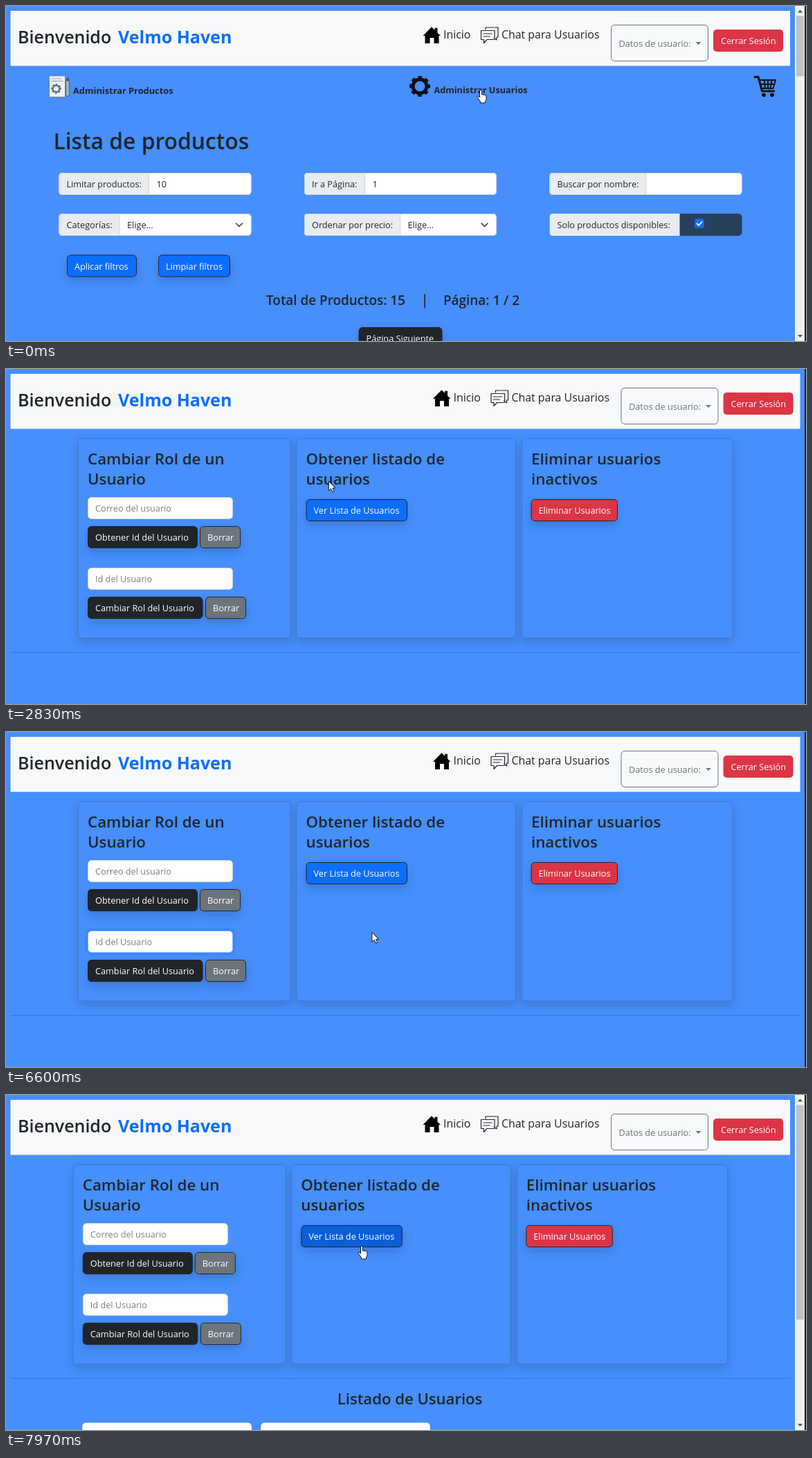
These frames come from a looping animation (1156 by 484 pixels, 8 s). An HTML page:

```html
<!DOCTYPE html>
<html lang="es">
<head>
<meta charset="utf-8">
<style>
  html, body { margin: 0; width: 100%; height: 100%; overflow: hidden; background: #468ffc; }
  svg { display: block; font-family: "Open Sans", "Noto Sans", sans-serif; }
  .shadow { filter: drop-shadow(0 6.8px 6.8px rgba(0, 0, 0, .15)); }
</style>
</head>
<body>
<svg id="stage" width="1156" height="484" viewBox="0 0 1156 484"></svg>
<script>
const LOOP = 8000;
const BLUE = '#0d6efd', INK = '#212529', RED = '#dc3545', GRAY = '#6c757d', PAGE = '#468ffc';
const stage = document.getElementById('stage');

// ---- drawing helpers ----
const text = (x, y, s, size = 12.7, weight = 400, fill = INK) =>
  `<text x="${x}" y="${y}" font-size="${size}" font-weight="${weight}" fill="${fill}">${s}</text>`;
const rect = (x, y, w, h, fill, extra = '') =>
  `<rect x="${x}" y="${y}" width="${w}" height="${h}" fill="${fill}" ${extra}/>`;
const path = (d, fill, extra = '') => `<path d="${d}" fill="${fill}" ${extra}/>`;
const line = (d, color, width) =>
  path(d, 'none', `stroke="${color}" stroke-width="${width}" stroke-linecap="round" stroke-linejoin="round"`);
const group = (id, body) => `<g id="${id}">${body}</g>`;

const button = (x, y, w, label, fill, id = '') => `<g ${id && `id="${id}"`}>
  ${rect(x + .5, y + .5, w - 1, 31, fill, 'rx="5" stroke="#212529" class="shadow"')}
  ${text(x + 11, y + 21, label, 12.7, 400, '#fff')}</g>`;

const input = (id, y, label) => group(id,
  rect(116.5, y - 1.5, 213, 35, 'none', 'rx="6.5" stroke="#0d6efd" stroke-opacity=".25" stroke-width="3.4" class="ring"') +
  rect(118.5, y + .5, 209, 31, '#fff', 'rx="5" stroke="#ced4da" class="box"') +
  text(129, y + 21, label, 12.7, 400, '#7b8085') +
  rect(128.5, y + 8, 1.2, 17, '#111', 'class="caret"'));

const field = (x, y, labelWidth, label, value = '', kind = '') => {
  const split = x + labelWidth, dark = kind === 'check';
  return rect(x, y, 278, 32, dark ? '#283f5b' : '#fff', 'rx="5"') +
    path(`M${split} ${y}H${x + 5}q-5 0 -5 5v22q0 5 5 5H${split}z`, '#e9ecef') +
    (dark ? '' : line(`M${split} ${y + .5}v31`, '#ced4da', 1) +
      rect(x + .5, y + .5, 277, 31, 'none', 'rx="5" stroke="#ced4da"')) +
    text(x + 11, y + 20.8, label) + text(split + 11, y + 20.8, value) +
    (kind === 'select' ? line(`M${x + 256} ${y + 14}l4.5 4.5l4.5 -4.5`, '#343a40', 1.5) : '') +
    (dark ? rect(split + 21.5, y + 7.5, 13.5, 13.5, BLUE, 'rx="3"') +
      line(`M${split + 25} ${y + 14.5}l2.5 2.5l4.5 -5`, '#fff', 1.8) : '');
};

const gear = (x, y, scale, color) => `<g transform="translate(${x} ${y}) scale(${scale})" fill="none" stroke="${color}">
  <circle r="10" stroke-width="5"/>
  <circle r="13" stroke-width="4" stroke-dasharray="5.4 4.81" transform="rotate(-12)"/></g>`;

// ---- page parts ----
const nav =
  path('M602.5 43L615 30.3l4.5 4.5v-3h4v7l4.5 4.2h-2.5v11h-7v-8h-6v8h-7v-11z', '#000') +
  text(632, 46.5, 'Inicio', 15.9) +
  line('M693 34v-3h18v14h-2v4l-4 -3M686.5 35.5h19.5v13h-11l-4.5 5v-5h-4z', INK, 1.2) +
  line('M690 40h12M690 44h9', INK, 1.1) +
  text(716, 46.5, 'Chat para Usuarios', 15.9) +
  rect(874.5, 27.5, 140, 52, 'none', 'rx="5" stroke="#6c757d"') +
  text(885.5, 58.6, 'Datos de usuario:', 12.7, 400, GRAY) +
  path('M996.5 52h8l-4 4z', GRAY) +
  rect(1022, 34, 101, 32, RED, 'rx="5"') +
  text(1033, 55, 'Cerrar Sesión', 12.7, 400, '#fff');

const header =
  `<rect id="bar" x="6.5" y="7" height="79.5" fill="#f8f9fa"/>` +
  text(17, 54, 'Bienvenido', 25, 600) + text(162, 54, 'Velmo Haven', 25, 700, BLUE) +
  group('nav', nav);

const productIcon =
  rect(62.5, 101, 23, 30.5, '#eef1f3', 'stroke="#7b8794"') +
  line('M66 105h14M66 108.5h16', '#8d99a5', 1.2) + gear(72.5, 119.5, .48, '#66717c') +
  rect(86.5, 108, 5, 22, '#9db4cf', 'stroke="#4c5a69" rx="1"') +
  path('M86 108l3 -6l3 6z', '#4c5a69');

const cart =
  line('M1082 102.5h5l5.5 20.5h17', '#111', 3) +
  line('M1088 107h24l-3.5 12h-17.5M1089.5 113h21M1095.5 107l1.5 12M1101 107v12M1106.5 107l-2 12', '#111', 2) +
  '<circle cx="1095" cy="128.5" r="2.8"/><circle cx="1107" cy="128.5" r="2.8"/>';

const productsPage =
  productIcon + text(97, 127, 'Administrar Productos', 12.8, 700) +
  gear(598, 116, 1, '#111') + text(618.5, 125.5, 'Administrar Usuarios', 12.7, 700) + cart +
  text(68.5, 207, 'Lista de productos', 31.8, 600) +
  field(76.5, 241, 130, 'Limitar productos:', '10') +
  field(431, 241, 87.5, 'Ir a Página:', '1') +
  field(785.5, 241, 139.5, 'Buscar por nombre:') +
  field(76.5, 300, 87.5, 'Categorías:', 'Elige...', 'select') +
  field(431, 300, 138.5, 'Ordenar por precio:', 'Elige...', 'select') +
  field(785.5, 300, 188, 'Solo productos disponibles:', '', 'check') +
  button(88, 359.5, 101, 'Aplicar filtros', BLUE) + button(220, 359.5, 104, 'Limpiar filtros', BLUE) +
  text(376, 432, 'Total de Productos: 15', 18.9, 600) + text(600, 431, '|', 18.9, 600) +
  text(632, 432, 'Página: 1 / 2', 18.9, 600) +
  button(509.5, 464, 121, 'Página Siguiente', INK);

const card = (x, w, top, bottom) =>
  rect(x + .5, 100.5, w - 1, 288, PAGE, 'rx="5" stroke="#4279c8" class="shadow"') +
  text(x + 14, 138, top, 22.3, 600) + text(x + 14, 167, bottom, 22.3, 600);

const usersPage =
  card(104, 308, 'Cambiar Rol de un', 'Usuario') +
  card(419.5, 317.5, 'Obtener listado de', 'usuarios') +
  card(745, 305.5, 'Eliminar usuarios', 'inactivos') +
  input('mail', 185, 'Correo del usuario') +
  button(118, 227, 159, 'Obtener Id del Usuario', INK, 'getId') + button(280, 227, 59, 'Borrar', GRAY) +
  input('userId', 287, 'Id del Usuario') +
  button(118, 329, 166.5, 'Cambiar Rol del Usuario', INK) + button(288, 329, 59, 'Borrar', GRAY) +
  button(433.5, 188, 146.5, 'Ver Lista de Usuarios', BLUE, 'list') +
  button(758.5, 188, 125.5, 'Eliminar Usuarios', RED) +
  group('spinner', path('M8.49 8.49A12 12 0 1 1 8.49 -8.49', 'none', `stroke="${INK}" stroke-width="3.2"`)) +
  group('results', text(486, 447, 'Listado de Usuarios', 22.1, 600)) +
  group('cards', rect(117.5, 473.5, 244.5, 30, '#fff', 'rx="5"') + rect(375.5, 473.5, 244.5, 30, '#fff', 'rx="5"'));

const scrollbar =
  rect(1140, 0, 14, 484, '#f1f1f1') +
  '<rect id="thumb" x="1142" y="14.5" width="11" fill="#c1c1c1"/>' +
  path('M1144 9.5h7l-3.5 -4z', '#505050') + path('M1144 475h7l-3.5 4z', '#505050');

const arrow = path('M0 0v14l3.3 -3l2.3 5l2.2 -1l-2.2 -4.8h4z', '#fff', 'stroke="#111" stroke-width="1"');
const hand = path('M-1.5 1.2q1.5 -2.4 3 0v6q1.3 -1.2 2.5 .2q1.2 -.9 2.2 .5q1.5 -.5 1.8 1.1v4.5' +
  'q-.5 2 -1.5 3v2.5h-7v-2q-2 -2.5 -4.5 -6.5q0 -1.8 2 -1l1.5 1.6z', '#fff', 'stroke="#111" stroke-width="1"');

stage.innerHTML = rect(0, 0, 1156, 484, PAGE) + header +
  group('products', productsPage) +
  group('users', usersPage) +
  `<path id="rule" fill="none" stroke="#3874e8"/>` +
  group('scroll', scrollbar) +
  rect(1154, 0, 2, 484, '#18202c') +
  group('cursor', group('arrow', arrow) + group('hand', hand));

// ---- animation ----
const $ = id => document.getElementById(id);
const show = (el, on) => el.setAttribute('display', on ? 'inline' : 'none');
const move = (id, x, y) => $(id).setAttribute('transform', `translate(${x} ${y})`);
const within = (t, a, b) => t >= a && t < b;

// Pointer stops: time, x, y
const track = [
  [0, 686, 121], [2430, 686, 121], [3240, 240, 204], [3970, 240, 204], [4220, 200, 298],
  [4630, 200, 298], [5370, 529, 290], [6560, 529, 290], [7300, 516, 209], [7770, 516, 209], [7970, 514, 218]
];

function pointer(t) {
  const i = track.findIndex(p => p[0] > t);
  if (i < 0) return track[track.length - 1].slice(1);
  const [t0, x0, y0] = track[i - 1], [t1, x1, y1] = track[i];
  const u = (t - t0) / (t1 - t0), k = u * u * (3 - 2 * u);
  return [x0 + (x1 - x0) * k, y0 + (y1 - y0) * k];
}

function focus(id, t, from, to) {
  const on = within(t, from, to);
  const part = name => $(id).querySelector('.' + name);
  show(part('ring'), on);
  part('box').setAttribute('stroke', on ? '#86b7fe' : '#ced4da');
  show(part('caret'), on && (t - from) % 1060 < 530);
}

function draw(t) {
  const onProducts = t < 1670, loading = within(t, 7360, 7560), loaded = t >= 7560;
  const scrolls = onProducts || loaded;

  show($('products'), onProducts);
  show($('users'), !onProducts);
  show($('rule'), !onProducts);
  show($('scroll'), scrolls);
  $('thumb').setAttribute('height', onProducts ? 87 : 310);
  $('bar').setAttribute('width', scrolls ? 1126.5 : 1141);
  $('rule').setAttribute('d', `M6.5 409.5H${scrolls ? 1133 : 1147.5}`);
  move('nav', scrolls ? 0 : 14.5, 0);
  move('users', loaded ? -7.2 : 0, 0);

  focus('mail', t, 3600, 4530);
  focus('userId', t, 4530, 7330);

  const [x, y] = pointer(t);
  const inBox = (x0, y0, x1, y1) => x >= x0 && x <= x1 && y >= y0 && y <= y1;
  const onInput = inBox(118, 185, 328, 217) || inBox(118, 287, 328, 319);
  const onGetId = inBox(118, 227, 277, 259);
  const onList = inBox(433, 188, 580, 220);

  $('list').firstElementChild.setAttribute('fill', loading ? '#0a58ca' : onList && !onProducts ? '#0b5ed7' : BLUE);
  $('getId').firstElementChild.setAttribute('fill', onGetId ? '#424649' : INK);
  move('list', 0, loading ? 4.3 : 0);
  show($('spinner'), loading);
  $('spinner').setAttribute('transform', `translate(610.5 198.5) rotate(${(t - 7395) / 750 * 360})`);
  show($('results'), loading || loaded);
  show($('cards'), loaded);

  const useHand = onProducts || onList || onGetId;
  show($('cursor'), !onInput && !within(t, 1670, 1700));
  show($('hand'), useHand);
  show($('arrow'), !useHand);
  move('cursor', x, y);
}

const start = performance.now();
function tick() {
  draw((performance.now() - start) % LOOP);
  requestAnimationFrame(tick);
}
tick();
</script>
</body>
</html>
```
